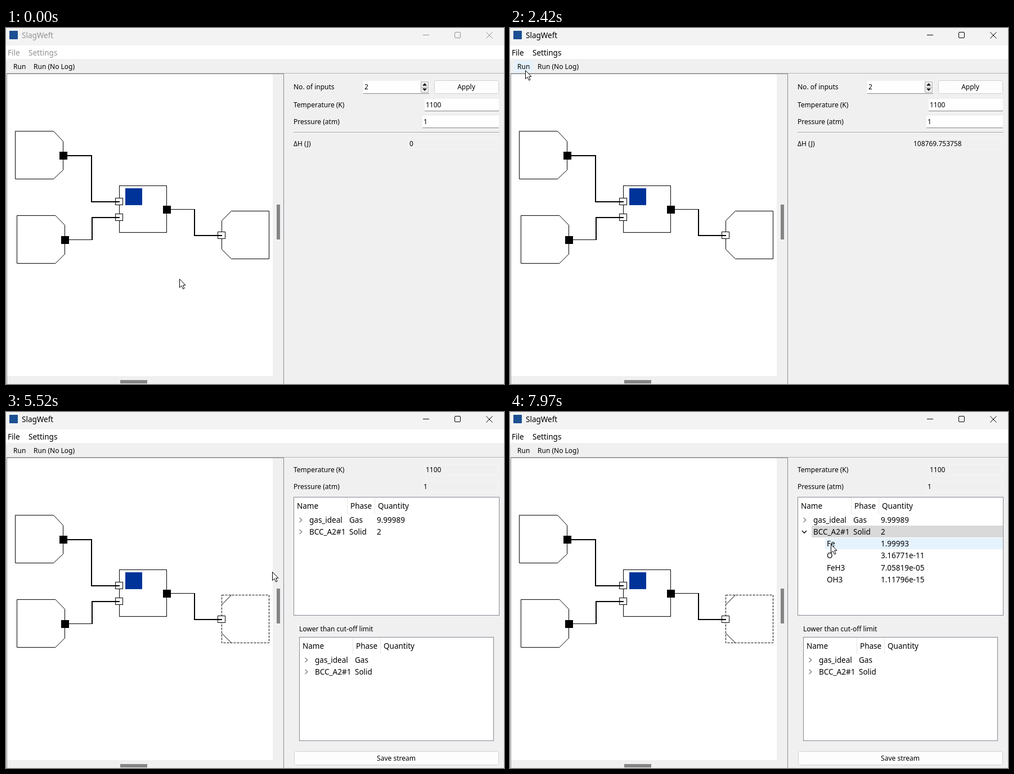
Write an HTML page that moves like this. It is 885 px wide and 633 px high and loops after 8 s.

```html
<!DOCTYPE html>
<html lang="en">
<head>
<meta charset="utf-8">
<title>SlagWeft</title>
<style>
html, body { margin: 0; width: 885px; height: 633px; overflow: hidden; background: #f0f0f0; }
svg { display: block; }
text { fill: currentColor; white-space: pre; }
.small { font: 12px "Noto Sans", sans-serif; }
.ui { font: 13.5px "Noto Sans", "Open Sans", sans-serif; }
.mid { text-anchor: middle; }
.line { fill: none; stroke: currentColor; }
.box { fill: #fff; stroke: #000; }
.button { fill: #fdfdfd; stroke: #d0d0d0; }
.locked { fill: none; stroke: #f6f6f6; }
.tree { fill: #fff; stroke: #828790; }

/* Every animation shares one 8 s loop: 1% = 80 ms */
.anim { animation: 8s step-end infinite; }
.chrome { animation-name: wake; }
.run-hover { animation-name: run-hover; }
.before-run { animation-name: before-run; }
.after-run { animation-name: after-run; }
.unselected { animation-name: unselected; }
.selected { animation-name: selected; }
.inputs { animation-name: inputs; }
.stream { animation-name: stream; }
.row-hover { animation-name: row-hover; }
.row-picked { animation-name: row-picked; }
.closed { animation-name: closed; }
.opened { animation-name: opened; }
.child-hover { animation-name: child-hover; }
.cursor { animation: move 8s linear infinite; }

@keyframes wake { 0% { color: #929292 } 27.75%, 100% { color: #000 } }
@keyframes run-hover { 0%, 43.5%, 100% { opacity: 0 } 23.625% { opacity: 1 } }
@keyframes before-run { 0% { opacity: 1 } 29.375%, 100% { opacity: 0 } }
@keyframes after-run { 0% { opacity: 0 } 29.375%, 100% { opacity: 1 } }
@keyframes unselected { 0% { opacity: 1 } 54%, 100% { opacity: 0 } }
@keyframes selected { 0% { opacity: 0 } 54%, 100% { opacity: 1 } }
@keyframes inputs { 0% { opacity: 1 } 54.875%, 100% { opacity: 0 } }
@keyframes stream { 0% { opacity: 0 } 54.875%, 100% { opacity: 1 } }
@keyframes row-hover { 0% { opacity: 0 } 76.875%, 100% { opacity: 1 } }
@keyframes row-picked { 0% { opacity: 0 } 81%, 100% { opacity: 1 } }
@keyframes closed {
  0% { opacity: 1; color: #777 }
  77.75% { opacity: 1; color: #000 }
  91.125%, 100% { opacity: 0; color: #000 }
}
@keyframes opened { 0% { opacity: 0 } 91.125%, 100% { opacity: 1 } }
@keyframes child-hover { 0% { opacity: 0 } 97.875%, 100% { opacity: 1 } }
@keyframes move {
  0% { transform: translate(308px, 446px) }
  12.25% { transform: translate(308px, 446px); animation-timing-function: steps(5, start) }
  16.625% { transform: translate(172px, 306px); animation-timing-function: steps(7, start) }
  22.75% { transform: translate(34px, 87px); animation-timing-function: steps(3, start) }
  25.375% { transform: translate(27px, 75px) }
  42.625% { transform: translate(27px, 75px); animation-timing-function: steps(7, start) }
  48.75% { transform: translate(259px, 273px); animation-timing-function: steps(5, start) }
  53.125% { transform: translate(421px, 371px); animation-timing-function: steps(2, start) }
  54.875% { transform: translate(431px, 372px) }
  64.625% { transform: translate(431px, 372px); animation-timing-function: steps(6, start) }
  69.875% { transform: translate(473px, 284px); animation-timing-function: steps(6, start) }
  75.125% { transform: translate(518px, 196px); animation-timing-function: steps(5, start) }
  79.5% { transform: translate(523px, 216px) }
  96.125% { transform: translate(523px, 216px); animation-timing-function: steps(4, jump-both) }
  99.625%, 100% { transform: translate(570px, 235px) }
}
</style>
</head>
<body>
<svg width="885" height="633" viewBox="0 0 885 633">
  <defs>
    <path id="chevron" class="line" stroke-width="1.2" d="M-2.5 -4L1.8 0L-2.5 4"/>
    <rect id="port-out" width="14" height="14"/>
    <rect id="port-in" class="box" x=".5" y=".5" width="13" height="12"/>
    <g id="phases" class="ui">
      <path d="M606.5 152V181M655.5 152V181" stroke="#e5e5e5"/>
      <text x="517" y="172">Name</text>
      <text x="612" y="172">Phase</text>
      <text x="661" y="172">Quantity</text>
      <text x="539" y="197">gas_ideal</text>
      <text x="610" y="197">Gas</text>
      <text x="539" y="218">BCC_A2#1</text>
      <text x="610" y="218">Solid</text>
      <use href="#chevron" x="524" y="192" color="#777"/>
    </g>
  </defs>

  <!-- Title bar, menu, toolbar -->
  <rect width="885" height="633" fill="#f0f0f0"/>
  <rect width="885" height="31" fill="#f3f3f3"/>
  <rect y="31" width="885" height="24" fill="#fff"/>
  <rect x="6" y="5" width="15" height="15" fill="#1c4f94"/>
  <g class="ui anim chrome">
    <text x="28" y="18">SlagWeft</text>
    <text x="3" y="49">File</text>
    <text x="40" y="49">Settings</text>
    <g class="line">
      <path d="M741 12.5H752M853.5 7.5L864.5 18.5M864.5 7.5L853.5 18.5"/>
      <rect x="797.5" y="7.5" width="10" height="10" rx="1.5"/>
    </g>
  </g>
  <path d="M.5 60V78" stroke="#b8b8b8" stroke-dasharray="1 2"/>
  <rect class="anim run-hover" x="7" y="58" width="34" height="21" fill="#e5f1fb"/>
  <g class="small">
    <text x="13" y="73">Run</text>
    <text x="49" y="73">Run (No Log)</text>
  </g>
  <path d="M0 80.5H885" stroke="#b4b4b4"/>

  <!-- Flow sheet -->
  <path class="line" color="#828790" d="M1.5 633V81.5H493.5V633"/>
  <rect x="2" y="82" width="472" height="537" fill="#fff"/>
  <g fill="#858585">
    <rect x="481" y="314" width="6" height="62"/>
    <rect x="203" y="626" width="48" height="6"/>
  </g>
  <path class="box" d="M16.5 183.5H84.5L101.5 201.5V252.5L84.5 268.5H16.5Z"/>
  <path class="box" d="M19.5 333.5H88L104.5 350.5V402L88 418.5H19.5Z"/>
  <rect class="box" x="201.5" y="280.5" width="84" height="83"/>
  <rect x="212" y="285" width="30" height="30" fill="#003399"/>
  <path class="box anim unselected" d="M400.5 325.5H467.5V410.5H400.5L383.5 393.5V342.5Z"/>
  <g class="line anim selected">
    <rect x="383.5" y="325.5" width="84" height="85" stroke-dasharray="4 2"/>
    <path d="M383.5 342.5L400.5 325.5M383.5 393.5L400.5 410.5"/>
  </g>
  <use href="#port-out" x="95" y="220"/>
  <use href="#port-out" x="98" y="370"/>
  <use href="#port-out" x="279" y="316"/>
  <use href="#port-in" x="194" y="302"/>
  <use href="#port-in" x="194" y="330"/>
  <use href="#port-in" x="376" y="362"/>
  <path class="line" d="M112 376.5H153M293 322.5H335"/>
  <path class="line" stroke-width="2" d="M109 227H152V309H202M153 377V337H202M335 322V369H384"/>

  <!-- Reactor settings -->
  <g class="small anim inputs">
    <text x="511" y="109">No. of inputs</text>
    <text x="511" y="141">Temperature (K)</text>
    <text x="511" y="171">Pressure (atm)</text>
    <text x="511" y="210">ΔH (J)</text>
    <path fill="#fff" d="M635 94H752V116H635ZM744 126H876V148H744ZM740 156H876V178H740Z"/>
    <path d="M635 116.5H752M744 147.5H876M740 177.5H876" stroke="#868686"/>
    <path d="M737.5 95.5H750.5V114.5H737.5ZM737.5 105.5H750.5" fill="#f0f0f0" stroke="#adadad"/>
    <path d="M740 102.5L744 98L748 102.5ZM740 107.5L744 112L748 107.5Z"/>
    <rect class="button" x="761.5" y="93.5" width="114" height="23" rx="3"/>
    <text class="mid" x="818" y="109">Apply</text>
    <text x="637" y="109">2</text>
    <text x="746" y="141">1100</text>
    <text x="742" y="171">1</text>
    <path d="M511 185.5H877" stroke="#a0a0a0"/>
    <path d="M511 186.5H877" stroke="#fff"/>
    <rect class="locked" x="715.5" y="195.5" width="160" height="20"/>
    <text class="anim before-run" x="717" y="210">0</text>
    <text class="anim after-run" x="717" y="210">108769.753758</text>
  </g>

  <!-- Stream results -->
  <g class="anim stream">
    <g class="small">
      <text x="511" y="107">Temperature (K)</text>
      <text x="511" y="137">Pressure (atm)</text>
      <rect class="locked" x="744.5" y="93.5" width="131" height="19"/>
      <rect class="locked" x="740.5" y="123.5" width="135" height="19"/>
      <text x="746" y="107">1100</text>
      <text x="742" y="137">1</text>
      <text x="521" y="390">Lower than cut-off limit</text>
      <rect class="button" x="512.5" y="603.5" width="363" height="24" rx="3"/>
      <text class="mid" x="693.5" y="620">Save stream</text>
    </g>
    <rect class="tree" x="511.5" y="151.5" width="365" height="210"/>
    <rect class="tree" x="521.5" y="400.5" width="345" height="184"/>
    <rect class="anim row-hover" x="536" y="202" width="340" height="21" fill="#e5f3ff"/>
    <rect class="anim row-picked" x="536" y="202" width="340" height="21" fill="#d9d9d9"/>
    <rect class="anim child-hover" x="560" y="224" width="316" height="20" fill="#e5f3ff"/>
    <use href="#phases"/>
    <use href="#phases" x="10" y="249"/>
    <use href="#chevron" x="534" y="462" color="#777"/>
    <g class="ui">
      <text x="659" y="197">9.99989</text>
      <text x="659" y="218">2</text>
      <use class="anim closed" href="#chevron" x="524" y="213"/>
      <g class="anim opened">
        <path class="line" stroke-width="1.4" d="M519 211L523 215.2L527 211"/>
        <text x="563" y="239">Fe</text><text x="659" y="239">1.99993</text>
        <text x="563" y="260">O</text><text x="659" y="260">3.16771e-11</text>
        <text x="563" y="282">FeH3</text><text x="659" y="282">7.05819e-05</text>
        <text x="563" y="303">OH3</text><text x="659" y="303">1.11796e-15</text>
      </g>
    </g>
  </g>

  <path class="box cursor" d="M.5 .5V15.5L4 12.3L6.5 18L9 17L6.6 11.3H11Z"/>
</svg>
</body>
</html>
```
